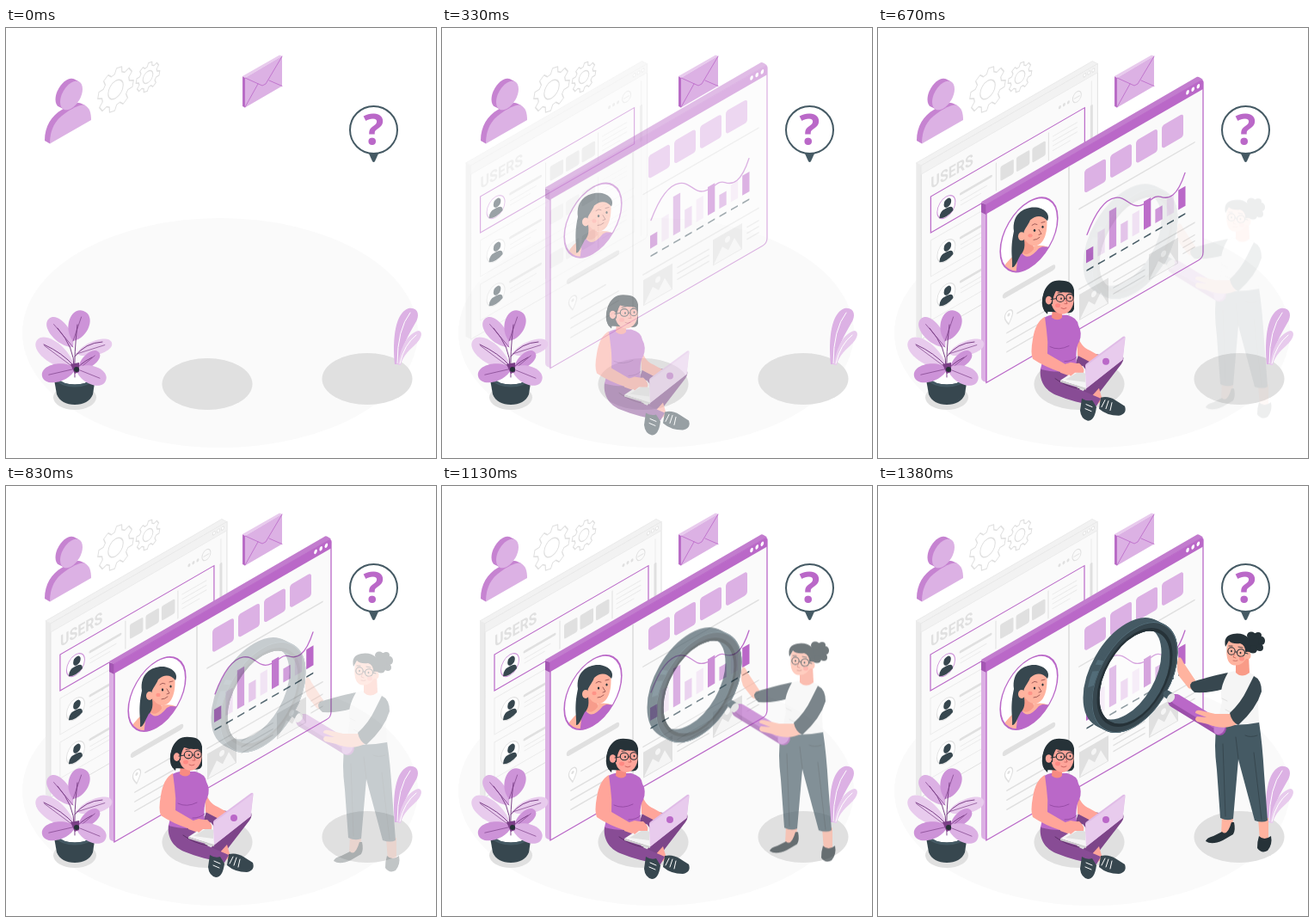
An HTML page that plays this animation: 500 by 500 pixels, repeating every 1.43 s.

```html
<!DOCTYPE html>
<html lang="en">
<head>
<meta charset="utf-8">
<title>User research</title>
<style>
html, body { margin: 0; width: 100%; height: 100%; overflow: hidden; background: #fff; }
svg { display: block; width: 100%; height: 100%; }
</style>
</head>
<body>
<svg id="stage" viewBox="0 0 500 500"></svg>
<script>
const MAIN = '#ba68c8', MID = '#cd93d8', SOFT = '#dcb1e4', PALE = '#e8cbed';
const INK = '#263238', SLATE = '#37474f', STEEL = '#455a64';
const GREY = '#e0e0e0', MIST = '#ebebeb', SHEET = '#fafafa';
const SKIN = '#ffb39f', ROSY = '#ffa59a';

// shape helpers
const path = (d, fill, more = '') => `<path d="${d}" fill="${fill}" ${more}/>`;
const line = (d, color, w = 1, more = '') =>
  `<path d="${d}" fill="none" stroke="${color}" stroke-width="${w}" stroke-linecap="round" stroke-linejoin="round" ${more}/>`;
const oval = (x, y, rx, ry, fill, more = '') =>
  `<ellipse cx="${x}" cy="${y}" rx="${rx}" ry="${ry}" fill="${fill}" ${more}/>`;
const rect = (x, y, w, h, fill, more = '') =>
  `<rect x="${x}" y="${y}" width="${w}" height="${h}" fill="${fill}" ${more}/>`;
const group = (inner, more = '') => `<g ${more}>${inner}</g>`;
const wall = (x, y, inner) => group(inner, `transform="matrix(1 -.577 0 1 ${x} ${y})"`);
const at = (x, y, inner) => group(inner, `transform="translate(${x} ${y})"`);
const rows = (n, f) => Array.from({ length: n }, (_, i) => f(i)).join('');
const edge = (color, w = 1) => `stroke="${color}" stroke-width="${w}"`;

function leaf(x1, y1, x2, y2, w, fill, vein) {
  const dx = x2 - x1, dy = y2 - y1, len = Math.hypot(dx, dy);
  const nx = -dy / len * w, ny = dx / len * w;
  const ctl = (k, s) => `${x1 + dx * k + nx * s} ${y1 + dy * k + ny * s}`;
  return path(`M${x1} ${y1}C${ctl(.25, 1)} ${ctl(1, 1)} ${x2} ${y2}C${ctl(1, -1)} ${ctl(.25, -1)} ${x1} ${y1}Z`, fill) +
    line(`M${x1} ${y1}L${ctl(.8, 0)}`, vein, .7);
}

function gear(x, y, r) {
  const pts = [];
  for (let i = 0; i < 8; i++)
    [[-.27, .77], [-.15, 1], [.15, 1], [.27, .77]].forEach(([a, k]) => {
      const ang = i * Math.PI / 4 + a + .2;
      pts.push((Math.cos(ang) * r * k).toFixed(1) + ' ' + (Math.sin(ang) * r * k).toFixed(1));
    });
  return group(path('M' + pts.join('L') + 'Z', '#fff', edge(GREY, 1.3) + ' stroke-linejoin="round"') +
    oval(0, 0, r * .42, r * .42, '#fff', edge(GREY, 1.3)),
    `transform="matrix(.866 -.5 0 1 ${x} ${y})"`);
}

function plant() {
  const dark = '#7b3f87';
  return path('M55.5 406L59 426C62 434 70 438 80 438S98 434 101 426L104 406Z', SLATE) +
    oval(80, 405, 21, 9.5, '#fff') + line('M59 408Q65 416 80 416T101 408', STEEL, 3) +
    leaf(79, 395, 36, 363, 16, PALE, dark) +
    leaf(78, 371, 50, 338, 14, SOFT, dark) +
    leaf(78, 364, 90, 329, 16, MID, dark) +
    leaf(82, 379, 123, 366, 11, PALE, dark) +
    leaf(84, 397, 108, 377, 10, MID, dark) +
    line('M80 406Q79 378 83 345M79 395Q80 372 60 349M79 393Q66 378 44 368M80 382Q92 366 112 365M80 400Q84 391 100 383', dark, 1) +
    leaf(81, 396, 42, 405, 14, MID, dark) +
    leaf(81, 396, 116, 410, 14, SOFT, dark) +
    path('M75 391L85 389V400L80 402Z', dark) + oval(82, 397, 3, 3, INK);
}

function decor() {
  return oval(249, 354.5, 230, 133.5, SHEET) +
    oval(234, 414, 52.5, 30, GREY) + oval(420, 408, 52.5, 30, GREY) + oval(80, 429.5, 25, 14.5, GREY) +
    path('M452 391C449 360 453 331 468 326C479 324 482 334 476 343C468 357 460 370 457 391Z', SOFT) +
    path('M456 392C458 371 468 354 480 352C486 354 482 363 475 369C466 377 461 383 459 392Z', PALE) +
    line('M455 390Q455 350 470 331M458 390Q463 368 477 357', '#fff', 1) +
    gear(127.5, 71.5, 24) + gear(165, 57, 16) +
    // user badge
    path('M45 131C45 114 53 102 65 95C73 90 82 85 88 88L92 90L51 134.5Z', '#c683d1') +
    path('M51 134.5C51 118 57 107 69 99C78 93 87 88 92 90C97 93 99 98 99 107Z', SOFT) +
    wall(70.5, 75.5, oval(0, 0, 13, 15, '#c683d1')) + wall(73.5, 77, oval(0, 0, 13, 15, '#c683d1')) +
    wall(76, 78.5, oval(0, 0, 13, 15, SOFT)) +
    // envelope
    path('M275 56L278 58V92.5L275 91Z', '#b96cc6') + path('M275 56L318 31.5L321 32.5L278 58Z', PALE) +
    path('M278 58L321 32.5V67.5L278 92.5Z', SOFT) +
    line('M278 58L298 67L302 65L321 33M278 92L293 65M321 67.5L306 61', MAIN, .8) +
    // question bubble
    path('M421.5 145H433.5L429 155Q427.5 157 426 155Z', STEEL) +
    oval(427.5, 118.5, 27.5, 27.5, '#fff', edge(STEEL, 2)) +
    `<text x="427.5" y="136" text-anchor="middle" font-family="'Open Sans','Noto Sans',sans-serif" font-weight="700" font-size="50" fill="${MAIN}">?</text>`;
}

function userRow(i) {
  const on = i === 0;
  return at(11, 42.3 + i * 51,
    rect(0, 0, 179, 42, SHEET, edge(on ? MAIN : MIST, on ? 1.2 : 1)) +
    oval(18, 22.5, 10.5, 12, '#fff', edge(on ? MID : GREY, 1)) +
    oval(19.5, 18.5, 4.3, 5, SLATE) + path('M10 31Q10 23 18 24Q26 24 26 31Q18 36 10 31Z', SLATE) +
    line('M35 17H70', GREY, 3) + line('M35 25H65M35 30H58', MIST, 1.2) +
    line('M76 5V37M137 5V37', GREY, 1) +
    rows(3, k => rect(81 + k * 18.5, 12, 15.5, 17, GREY, 'rx="2"')) +
    line('M142 12H170M142 17.5H170M142 23H170M142 28.5H162', MIST, 1.2));
}

function backWindow() {
  return path('M44 157L50 160V362L44 359Z', MIST) + path('M44 157L249 38.5L255 41.7L50 160Z', '#f2f2f2', edge(MIST)) +
    wall(50, 160,
      path('M0 0H205V198Q205 202 201 202H0Z', SHEET, edge(GREY, 1)) +
      rect(0, 0, 205, 10, '#f2f2f2', edge(MIST, .8)) +
      rows(3, i => oval(190 + i * 5, 4.5, 1.5, 1.9, '#fff', edge(GREY, .8))) +
      rows(3, i => oval(161 + i * 5, 25, 1.5, 1.9, GREY)) +
      oval(181, 24.5, 5, 6, SHEET, edge(GREY, 1)) + line('M178 25H184', GREY) +
      line('M198 16V196', MIST, 1) + line('M198 45V85', GREY, 3) +
      group(`<text font-family="Roboto,sans-serif" font-weight="700" font-size="18.5" fill="${GREY}">USERS</text>`,
        'transform="translate(11 33.5) scale(.866 1)"') +
      rows(3, userRow));
}

function portrait() {
  return group(
    path('M145 280Q152 266 166 260L182 253Q196 250 210 262L190 290H150Z', SKIN) +
    path('M160 288L163 263L167 261Q174 272 187 256L191 254Q206 254 212 262L190 292Z', MAIN) +
    path('M167 238L180 248L181 257Q174 266 167 261Z', '#f79c8b') +
    path('M167 222C165 242 173 254 184 253C194 250 198 236 196 217L180 211Z', SKIN) +
    // hair and its long strand
    path('M158 236C155 214 173 206 186 208.5C197 211 200 219 197 224C191 217 184 217 177 223C174 231 169 233 169 242C172 252 170 260 166 263C162 270 160 278 156 278C157 268 153 259 158 236Z', SLATE) +
    oval(167, 242, 4, 5, SKIN) + oval(182, 235, 1.2, 1.6, INK) + oval(191.5, 231, 1.1, 1.5, INK) +
    line('M179 229Q182 226 185 228M190 226L194 225M187 234L190 239L187 240M181 246Q185 246 188 243', '#8d4a4a', .8) +
    oval(177, 241, 2.6, 2.2, '#ff9488'), 'clip-path="url(#face)"');
}

function frontWindow() {
  const heights = [15, 28, 45, 22, 26, 33, 16, 20, 23];
  const tones = [MAIN, '#efe0f2', MID, '#e3c3e9', '#f0e1f3', MAIN, MID, '#f0e1f3', MAIN];
  const picture = x => at(x, 167, rect(0, 0, 34, 30, GREY) +
    path('M1 29L11 14L18 22L25 12L33 29Z', '#f5f5f5') + oval(17, 9, 3, 3.5, '#f5f5f5'));
  const frame = (fill, more) => oval(49.5, 63.6, 33.3, 38.5, fill, more);
  return path('M120 203Q120 201 122 202L126 205V412L122 410Q120 409 120 406Z', SOFT) +
    path('M120 203L126 205V217L120 214Z', '#a457b3') +
    path('M120 202L371 56.5Q373 55.5 378 60L126 205.5Z', '#c27cce') +
    wall(126, 205,
      path('M0 0H248Q252 0 252 4V201Q252 207 247 207H0Z', SHEET, edge(MAIN, 1.3)) +
      path('M0 0H248Q252 0 252 4V11H0Z', MAIN) +
      rows(3, i => oval(234 + i * 6.2, 4.5, 1.8, 2.5, '#fff')) +
      frame('#fff', '') +
      line('M22 118H77', GREY, 6.5) +
      path('M26 154Q21 146 21.5 143A4.5 5 0 0 1 30.5 143Q31 146 26 154Z', '#fff', edge(GREY, 1.3)) + oval(26, 143, 1.6, 1.8, GREY) +
      line('M36 147H64M24 163H79M24 174H79M24 185H79', GREY, 1.6) +
      line('M96 12V196', GREY, 1.8) +
      rows(4, i => rect(114 + i * 30, 26, 25, 27, SOFT, 'rx="3.5"')) +
      line('M108 67.3H242M108 160.6H242', GREY, 1.6) +
      heights.map((h, i) => rect(116 + i * 13.4, 135 - h, 8.3, h, tones[i])).join('') +
      `<path d="M116.5 144H232" stroke="${STEEL}" stroke-width="1.8" stroke-dasharray="8 5.35"/>` +
      picture(108) + picture(189) +
      line('M148 175H184M148 182H184M148 189H184M229 175H242M229 182H242M229 189H242', GREY, 1.5)) +
    portrait() + wall(126, 205, frame('none', edge(MAIN, 1.6))) +
    line('M243 240C252 216 263 199 276 197S293 209 305 206S320 193 329 196S348 196 357 168', MAIN, 1.3);
}

function sitter() {
  const pants = '#7d4589';
  return path('M235 374Q258 384 283 379Q288 384 283 391L256 426L246 436L233 430L254 402L228 396Z', pants) +
    path('M247 430L257 419L261 433L252 440Z', ROSY) +
    path('M189 396C187 411 195 422 207 427C222 433 238 437 254 440L259 431L231 419L248 405L226 392Z', '#884c95') +
    line('M206 408Q218 417 234 420M243 411L262 399', '#5f3069', 1) +
    // shoes
    path('M237 431Q243 435 249 433L254 441Q252 457 244 457Q236 455 235 445Z', SLATE) +
    path('M259 430Q268 428 276 433L287 440Q290 449 280 451Q266 451 257 443Z', SLATE) +
    line('M242 438L249 441M241 443L248 446M264 433L260 441M268 434L265 443M272 436L270 445', '#fff', 1) +
    // body
    path('M231 354Q235 371 246 375L262 384L255 393L232 381Z', ROSY) +
    path('M192 338Q200 333 206 334L220 334Q232 337 233 346Q238 355 234 365Q229 372 231 394Q217 404 189 397Q194 380 190 362Z', MAIN) +
    line('M200 371Q210 376 222 370M217 388Q226 388 231 383', '#954aa4', .9) +
    path('M203 325L214 332L214 337Q209 342 202 337Z', '#f78b82') +
    path('M194 336Q183 342 180 362Q177 378 180 385Q193 394 214 401L221 393L197 379Q198 365 196 352Z', ROSY) +
    path('M212 393L224 389Q236 390 240 397L237 403L226 406L212 401Z', ROSY) +
    // head
    path('M194 330Q188 322 193 307Q199 292 214 294Q226 294 228 305L228 327Q226 333 218 331Z', INK) +
    path('M201 311Q200 331 214 333Q227 332 228 314Q224 303 209 304Z', ROSY) +
    path('M197 333Q189 327 192 311Q196 296 210 295Q224 293 228 307Q215 309 207 306Q203 313 203 321L199 322Z', INK) +
    oval(198.5, 317, 3.7, 4.8, ROSY) +
    oval(212, 314.5, 4.7, 4.3, 'none', edge(INK, 1.1)) + oval(223, 314, 4.2, 4.3, 'none', edge(INK, 1.1)) +
    oval(213, 315, .9, 1.2, INK) + oval(223.5, 314, .9, 1.2, INK) +
    line('M201 316L207 315M217 315H219', INK, 1) + line('M209 308.5L214 307.5M221 307.5L225 308', INK, .8) +
    line('M218 315L220 321L217 321M213 326Q216 328 219 326', '#c25a58', .8) + oval(209, 323, 3, 2.4, '#ff8a84') +
    // laptop
    path('M212 410L238 393L242 398V419.5Z', '#f5f5f5') + path('M212 410L242 419V421L212 412Z', '#cfcfcf') +
    path('M218 409L235 399L241 402V412Z', GREY) +
    path('M218 391L234 390Q241 396 239 401L229 401L224 405L219 400Z', ROSY) +
    path('M241 393Q241 391 243 390L285 359Q288 358 287.5 361L284.5 386L242 419.5Z', '#e0bce7') +
    path('M242 393L287 360L284.5 386L242 419.5Z', PALE) +
    oval(265, 388, 4, 4, MAIN);
}

function magnifier() {
  const cx = 298.5, cy = 222.5;
  const ring = (d, color, w, r = 0, more = '') => wall(cx - d, cy - d * .5,
    oval(0, 0, 45.5 + r, 53 + r, 'none', edge(color, w) + more));
  return wall(cx, cy, oval(0, 0, 46, 53, '#fff', 'opacity=".4"')) +
    rows(6, i => ring(10 - i * 2, STEEL, 9)) +
    ring(6, '#607d8b', 9, 0, ' pathLength="100" stroke-dasharray="0 54 5 2 1.5 100" opacity=".5"') +
    ring(0, SLATE, 9) + ring(0, INK, 3, -3) + ring(0, '#546e7a', .8, 4) +
    // handle
    line('M336 242L346 249', STEEL, 9) + line('M345 250L397 282', '#9c4fab', 16) +
    line('M347 248L398 279', MAIN, 12) + oval(340.5, 246.5, 4, 6, '#e6e6e6', 'transform="rotate(32 340.5 246.5)"') +
    oval(397, 281.5, 6, 8, '#c680d2', 'transform="rotate(32 397 281.5)"');
}

function analyst() {
  return path('M400 384L413 386L412 404L399 405Z', SKIN) + path('M442 386L454 386L454 412L444 412Z', SKIN) +
    path('M400 402Q406 408 411 391L414 391Q416 400 413 405L401 412Q388 418 381 413Q382 409 390 407Z', INK) +
    path('M443 407Q449 413 457 407Q459 417 453 424Q446 428 441 421Q441 413 443 407Z', INK) +
    // trousers
    path('M394 276Q390 300 394 330L398 386Q406 390 413 387L419 318L438 389Q447 392 453 389L449 335Q447 300 443 274Z', STEEL) +
    line('M419 317L416 292M427 290Q433 293 441 290M401 300L404 384M437 310L446 388', SLATE, 1) +
    // far arm
    path('M349 200Q352 197 355 205L369 226L371 239L361 235L350 221Q346 210 349 200Z', SKIN) +
    path('M408 217Q394 219 365 228Q360 233 368 240Q386 241 402 236Z', SLATE) +
    // top
    path('M407 217Q418 213 432 217L441 222Q446 240 442 254L443 275Q418 280 395 276L400 250Q396 236 407 217Z', '#f5f5f5') +
    line('M404 260Q413 266 420 262M400 247L406 250', GREY, 1) +
    path('M416 203L431 197L432 217Q423 224 416 217Z', '#f99b87') +
    // head
    oval(438, 181, 8.5, 10, INK) + oval(446, 180, 4, 5, INK) + oval(434, 174, 5, 4.5, INK) +
    oval(442, 174, 4, 4, INK) + oval(444, 188, 4, 4, INK) + oval(436, 190, 5, 4.5, INK) +
    path('M406 183Q403 204 412 208Q424 211 430 197L428 180L412 176Z', SKIN) +
    path('M404 187Q401 174 413 172Q424 170 431 177Q436 188 430 200L427 192Q427 185 421 183Q412 184 408 180Z', INK) +
    oval(430, 197, 3.5, 4.2, SKIN) +
    oval(411, 192, 4.2, 4.2, 'none', edge(INK, 1.1)) + oval(422, 194, 4.5, 4.3, 'none', edge(INK, 1.1)) +
    oval(411, 192, .9, 1.2, INK) + oval(421.5, 194, .9, 1.2, INK) +
    line('M415.5 193H417.5M426.5 194L430 195', INK, 1) + line('M408 186L412 186M419 187L424 188', INK, .8) +
    line('M415 194L413 199L416 200M413 203Q416 204 418 203', '#c2655a', .8) + oval(423, 201, 3, 2.4, '#ff9488') +
    magnifier() +
    // near arm
    path('M410 265L419 276Q403 285 384 277L371 274Q367 271 371 268L382 269L369 264Q369 260 375 261L392 265Z', SKIN) +
    path('M437 221Q446 225 446 239Q440 259 419 278Q411 274 409 264Q422 252 429 237Z', SLATE);
}

const stage = document.getElementById('stage');
stage.innerHTML = `<defs><clipPath id="face"><ellipse cx="49.5" cy="63.6" rx="33.3" ry="38.5" transform="matrix(1 -.577 0 1 126 205)"/></clipPath></defs>` +
  decor() + group(backWindow(), 'id="back"') + group(frontWindow(), 'id="front"') + plant() +
  group(sitter(), 'id="sitter"') + group(analyst(), 'id="analyst"');
const [back, front, seated, standing] = ['back', 'front', 'sitter', 'analyst'].map(id => document.getElementById(id));

const LOOP = 1430, FPS = 24, SHIFT = 30;

// cubic-bezier(.36, -.01, .5, 1.38)
function spring(x) {
  if (x <= 0) return 0;
  if (x >= 1) return 1;
  const curve = (u, a, b) => 3 * (1 - u) * (1 - u) * u * a + 3 * (1 - u) * u * u * b + u * u * u;
  let lo = 0, hi = 1;
  for (let i = 0; i < 24; i++) {
    const m = (lo + hi) / 2;
    if (curve(m, .36, .5) < x) lo = m; else hi = m;
  }
  return curve(lo, -.01, 1.38);
}

function place(node, k, dx, dy) {
  const left = (1 - k) * SHIFT;
  const alpha = Math.pow(Math.max(0, Math.min(1, k)), .87);
  node.setAttribute('transform', `translate(${(dx * left).toFixed(2)} ${(dy * left).toFixed(2)})`);
  node.setAttribute('opacity', alpha.toFixed(3));
}

function draw(now) {
  const t = Math.floor((now % LOOP + 5) * FPS / 1000) * 1000 / FPS;
  const a = t < 80 ? 0 : spring((t + 28) / 1000);
  const b = Math.pow(Math.max(0, Math.min(1, (t - 585) / 790)), 1.25);
  place(back, a, -1, 0);
  place(front, a, 0, -1);
  place(seated, a, 0, 1);
  place(standing, b, 0, 1);
}

let start = null;
function tick(now) {
  if (start === null) start = now;
  draw(now - start);
  requestAnimationFrame(tick);
}
draw(0);
requestAnimationFrame(tick);
</script>
</body>
</html>
```
